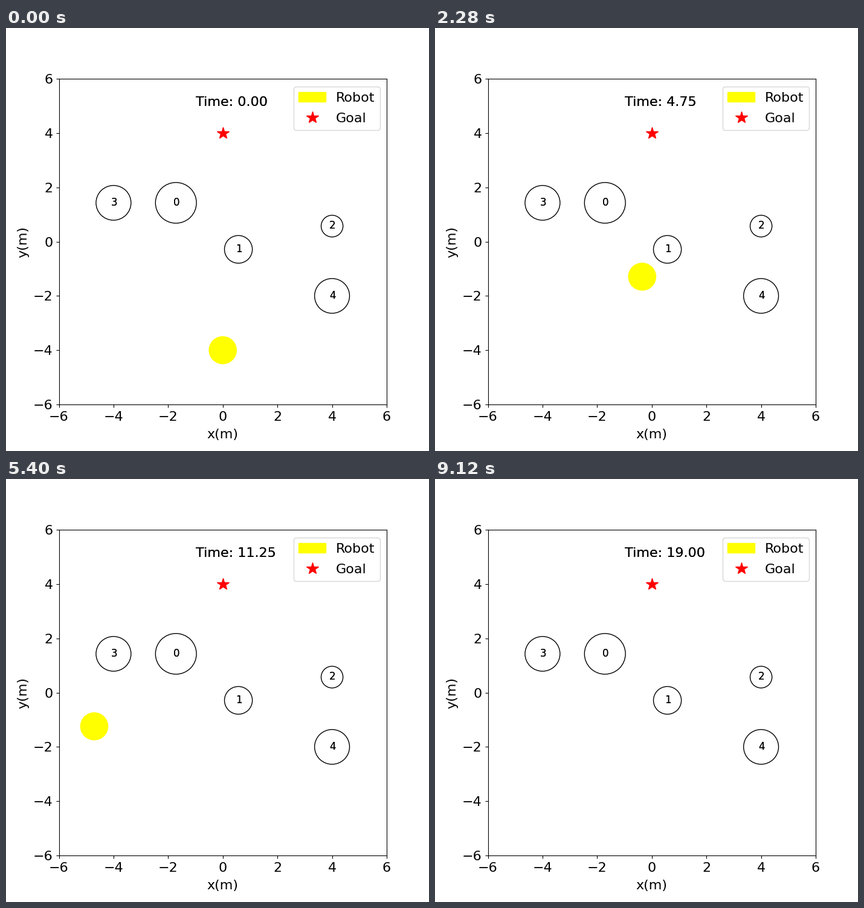
These frames come from a looping animation (700 px wide and 700 px high, 9240 ms). A matplotlib script:

```python
import numpy as np
import matplotlib.pyplot as plt
from matplotlib.animation import FuncAnimation
from matplotlib.lines import Line2D

plt.rcParams["font.family"] = "DejaVu Sans"

FRAMES, INTERVAL, STEP = 77, 120, 0.25
FONT = 16

# x, y, radius of each obstacle, in metres
OBSTACLES = [
    (-12 / 7, 10 / 7, 0.75),
    (4 / 7, -2 / 7, 0.51),
    (4, 4 / 7, 0.40),
    (-4, 10 / 7, 0.64),
    (4, -2, 0.64),
]

# The robot drives up, brakes, swings left past the obstacles and runs off.
KEY_STEPS = np.array([0, 6, 12, 24, 32, 38, 45, 52])
KEY_POINTS = np.array([
    (0, -4), (0, -2.5), (0, -2.075), (-0.685, -0.865),
    (-1.149, -0.857), (-1.95, -1.098), (-4.706, -1.242), (-6.9, -1.4),
])
SLOPES = np.gradient(KEY_POINTS, KEY_STEPS, axis=0)


def robot_at(step):
    """Smooth cubic motion through the key points."""
    step = min(step, KEY_STEPS[-1])
    k = min(np.searchsorted(KEY_STEPS, step, side="right"), len(KEY_STEPS) - 1) - 1
    span = KEY_STEPS[k + 1] - KEY_STEPS[k]
    u = (step - KEY_STEPS[k]) / span
    ease = u * u * (3 - 2 * u)
    bend = (1 - u) * SLOPES[k] - u * SLOPES[k + 1]
    return ((1 - ease) * KEY_POINTS[k] + ease * KEY_POINTS[k + 1]
            + span * u * (1 - u) * bend)


def label(x, y, text, size):
    """Two stacked copies give the slightly heavier lettering."""
    return [ax.text(x, y, text, fontsize=size, color="black") for _ in range(2)]


fig, ax = plt.subplots(figsize=(7, 7), dpi=100)
fig.subplots_adjust(left=0.125, right=0.9, bottom=0.11, top=0.88)
ax.set(xlim=(-6, 6), ylim=(-6, 6))
ax.tick_params(labelsize=FONT)
ax.tick_params(axis="x", pad=4.6)
ax.set_xlabel("x(m)", fontsize=FONT, labelpad=6.4)
ax.set_ylabel("y(m)", fontsize=FONT, labelpad=5)

robot = plt.Circle(KEY_POINTS[0], 0.5, color="yellow")
goal = Line2D([0], [4], color="red", marker="*", linestyle="None", markersize=15)
ax.add_artist(robot)
ax.add_artist(goal)
ax.legend([robot, goal], ["Robot", "Goal"], fontsize=FONT, loc="upper right",
          bbox_to_anchor=(1, 0.997), labelspacing=0.63, handletextpad=0.75)

for i, (x, y, radius) in enumerate(OBSTACLES):
    ax.add_artist(plt.Circle((x, y), radius, fill=False))
    label(x - 0.1, y - 0.1, str(i), 12)

clock = label(-1, 5, "Time: 0.00", FONT)


def update(step):
    robot.center = tuple(robot_at(step))
    for text in clock:
        text.set_text(f"Time: {step * STEP:.2f}")
    return [robot, *clock]


anim = FuncAnimation(fig, update, frames=FRAMES, interval=INTERVAL,
                     repeat=True, repeat_delay=0, blit=False)
plt.show()
```
